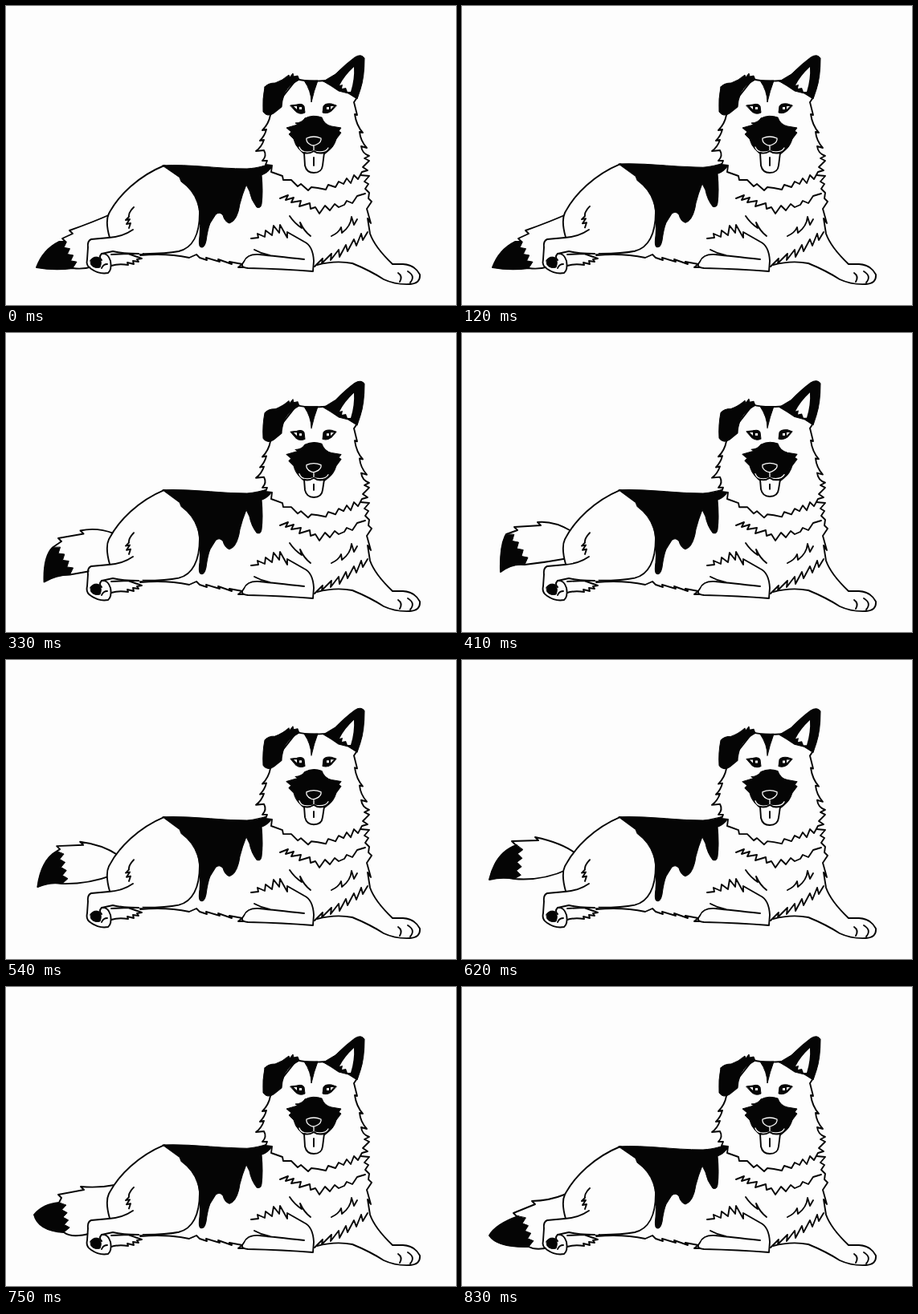
Recreate the animation shown at these times as an HTML page. Size 560 by 373 pixels, loop 910 ms.

```html
<!DOCTYPE html>
<html lang="en">
<head>
<meta charset="utf-8">
<title>Dog wagging its tail</title>
<style>
html, body { margin: 0; width: 100%; height: 100%; overflow: hidden; background: #fdfdfd; }
svg { display: block; width: 100vw; height: 100vh; }
path { fill: none; stroke: #050505; stroke-width: 1.9; stroke-linejoin: round; stroke-linecap: round; }
.w { fill: #fdfdfd; }
.b { fill: #050505; stroke-width: 1; }
.l { stroke: #fdfdfd; stroke-width: 1.3; }
.dot { fill: #fdfdfd; stroke: none; }
</style>
</head>
<body>
<svg viewBox="0 0 560 373">
  <path id="tail" class="w"/>
  <path id="tip" class="b"/>

  <g id="back">
    <path class="w" d="M129,289C125,275 125,265 128,259C140,236 165,212 197,199C228,212 241,240 241,258C241,285 232,302 215,306C195,310 175,309 160,309L130,306"/>
    <path class="b" d="M195,199C230,197 260,203 300,203C315,202 322,199 331,196L331,201Q325,209 318,211Q320,232 318,247Q317,253 312,251Q305,242 303,231L299,223Q294,235 291,247Q288,268 278,271Q272,269 270,261Q266,256 261,260L254,271Q251,278 249,293Q247,302 243,301Q239,301 241,287Q243,258 238,245Q233,230 218,219L216,214Z"/>
    <path d="M159,251Q152,258 153,263L149,267L154,266L150,272L155,271L153,277"/>
  </g>

  <g id="leg">
    <path class="w" stroke="none" style="stroke:none" d="M129,289L104,292L101,318L106,328L128,332L130,309L170,309L160,285Z"/>
    <path d="M158,279Q145,288 128,289L106,291Q101,293 102,301L101,316Q99,324 106,328Q116,335 127,333Q132,329 130,318Q127,308 119,309L133,306Q145,309 165,309"/>
    <path d="M131,310L152,309L169,315L163,316L165,319L158,318L159,322L151,320L152,323Q140,321 131,324"/>
    <path class="b" d="M105,317Q110,311 116,314Q120,319 117,326Q110,328 106,323Z"/>
    <path d="M119,309Q115,313 119,317M119,327Q121,322 126,322"/>
  </g>

  <path d="M167,311Q200,308 228,314L237,310L241,314L250,317L249,314L266,319L264,316L281,322L278,319L294,322L289,326L296,326"/>

  <path d="M371,316Q335,312 315,310Q300,309 296,319Q290,326 301,327Q345,328 382,331L383,318Q382,299 371,294L350,282L350,289L341,273L340,283L333,274L331,286L323,280L322,288L313,284L314,289L305,290"/>
  <path d="M309,304Q318,309 328,311"/>
  <path d="M353,262Q359,271 368,277L366,270Q371,281 379,287"/>
  <path d="M341,240L351,236L348,242L358,239L355,245L367,243L365,250L378,246L379,253L385,251L390,259L397,249L403,255L409,247L414,251L421,248L424,243L431,246L437,237L447,234"/>
  <path d="M405,287Q414,283 417,276L418,283Q429,275 430,263L433,273L437,266"/>
  <path d="M384,325L394,315L393,321L405,309L404,317L414,304L415,313L423,298L425,306L433,291L436,299L442,284L444,292L450,282"/>
  <path d="M387,323Q410,317 431,321Q453,330 470,341Q485,348 503,347Q516,346 515,335Q509,323 494,322L481,322Q459,301 453,284L450,265L454,271L449,253L455,244L451,240L452,233L447,228L451,222L446,219L452,212L441,211"/>
  <path d="M488,333Q494,337 490,344M500,331Q510,337 503,345"/>

  <g id="head">
    <path class="w" d="M329,136Q327,147 319,155L324,154Q322,162 316,168L321,167Q318,176 311,181L321,180Q325,187 319,193L325,193L323,198L331,199L330,207L344,212L345,217L355,217L363,225L367,222L376,230L380,226L388,227L398,229L401,223L410,226L414,219L420,222L424,215L429,221L433,211L438,216L443,207L450,205L444,201L452,193L446,190L452,187Q443,184 442,175L449,177Q441,168 440,157L444,158Q436,149 434,135L437,136L433,120L437,114L398,93Q375,95 362,91L335,125Z"/>
    <path class="b" d="M322,101Q326,96 335,96Q344,93 352,86L353,89L357,84L358,88L363,87L365,92Q352,99 347,108Q343,119 343,126L333,134Q325,139 320,132Q319,116 322,101Z"/>
    <path class="b" d="M395,94L410,85Q423,72 434,64Q442,59 446,65Q446,89 441,104L437,116L426,109L414,106Q404,99 395,94Z"/>
    <path class="dot" d="M433,76Q421,87 415,99L419,98L418,103L423,102L425,107L429,107Q434,91 433,76Z"/>
    <path class="b" d="M371,93L388,93Q383,106 380,120Q380,106 371,93Z"/>
    <path class="b" d="M354,124L362,123Q369,121 371,125L372,133Q366,136 361,132Z"/>
    <path class="b" d="M411,124L405,122Q397,121 395,125L394,133Q400,135 405,131Z"/>
    <path class="dot" d="M365,126h3v3h-3zM399,126h3v3h-3zM358,125l4,0l0,4zM408,125l-4,0l0,4z"/>
    <path class="b" d="M372,140Q382,135 393,139Q396,148 405,150L417,152L414,156L417,158L411,166Q408,176 401,181Q393,189 383,188Q371,187 365,179Q360,174 358,166L352,160L355,157L349,152L363,148L360,146Q368,146 372,140Z"/>
    <path class="l" d="M374,165Q383,161 392,165Q393,170 386,173Q382,175 379,173Q373,170 374,165ZM383,175V181M365,176Q368,185 383,181Q397,184 401,177"/>
    <path id="tongue" class="w"/>
    <path id="crease"/>
  </g>
</svg>
<script>
const $ = id => document.getElementById(id);
const LOOP = 910;
const STEPS = [0, 120, 160, 210, 250, 330, 370, 410, 540, 580, 620, 660, 710, 750, 790, 830];

// Tail points: root, curve, two tufts, dark edge, curve, tip, curve, dark edge, curve, root
const low = [132,259, 110,269, 79,280, 70,290, 66,294, 46,304, 38,326, 60,330, 83,327, 95,329, 108,325];
const rise = [132,253, 112,250, 91,257, 65,270, 61,284, 46,294, 47,323, 62,316, 81,314, 92,311, 106,307];
const high = [136,247, 114,234, 94,236, 65,242, 55,251, 47,264, 48,298, 62,287, 78,289, 105,286, 132,281];
const flick = [141,241, 124,228, 91,221, 62,226, 68,231, 42,240, 34,274, 50,270, 65,273, 100,276, 132,261];
const fall = [135,247, 115,251, 93,249, 65,259, 66,269, 46,271, 35,284, 40,304, 72,306, 82,314, 106,307];
const settle = [130,258, 108,267, 87,267, 64,282, 70,286, 42,296, 34,310, 44,325, 83,324, 92,329, 108,325];

// time, breath, head lift, tail
const KEYS = [
  [0, 0, 0, low], [120, .6, 0, low], [250, 1, .5, rise], [410, 1, 1, high],
  [620, 1, .5, flick], [750, .6, 0, fall], [830, 0, 0, settle], [LOOP, 0, 0, low]
];

const mix = (a, b, k) => a + (b - a) * k;

function drawTail(n) {
  const p = i => [n[2 * i], n[2 * i + 1]];
  const tuft = i => `L${p(i)}L${n[2 * i] + 4},${n[2 * i + 1] + 4}`;
  const edge = `Q${p(5)} ${p(6)}Q${p(7)} ${p(8)}`;
  $('tail').setAttribute('d',
    `M${p(0)}Q${p(1)} ${p(2)}${tuft(2)}${tuft(3)}L${p(4)}${edge}Q${p(9)} ${p(10)}`);

  // Fur teeth reach from the dark tip toward the body
  const [ax, ay] = p(8), [bx, by] = p(4);
  const dx = bx - ax, dy = by - ay, len = Math.hypot(dx, dy);
  let teeth = '';
  for (let i = 1; i < 8; i++) {
    const k = i / 8, out = i % 2 ? 8 : 2;
    teeth += `L${ax + dx * k - dy / len * out},${ay + dy * k + dx / len * out}`;
  }
  $('tip').setAttribute('d', `M${p(4)}${edge}${teeth}Z`);
}

function draw(time) {
  const t = STEPS.filter(s => s <= time).pop();
  const i = KEYS.findIndex(k => k[0] > t);
  const a = KEYS[i - 1], b = KEYS[i];
  const k = (t - a[0]) / (b[0] - a[0]);
  const breath = mix(a[1], b[1], k), lift = mix(a[2], b[2], k);

  drawTail(a[3].map((v, j) => mix(v, b[3][j], k)));
  const stretch = (id, y, s) =>
    $(id).setAttribute('transform', `translate(0 ${y}) scale(1 ${s}) translate(0 ${-y})`);
  stretch('back', 320, 1 + .026 * breath);
  stretch('head', 205, 1 + .014 * lift);

  const y = 208 - 4 * lift;
  $('tongue').setAttribute('d',
    `M371,183L372,${y - 9}Q374,${y} 383,${y}Q393,${y} 394,${y - 9}L396,183Q388,185 383,181Q377,185 371,183Z`);
  $('crease').setAttribute('d', `M383,189V${y - 9}`);
}

function frame(now) {
  draw(now % LOOP);
  requestAnimationFrame(frame);
}
draw(0);
requestAnimationFrame(frame);
</script>
</body>
</html>
```
